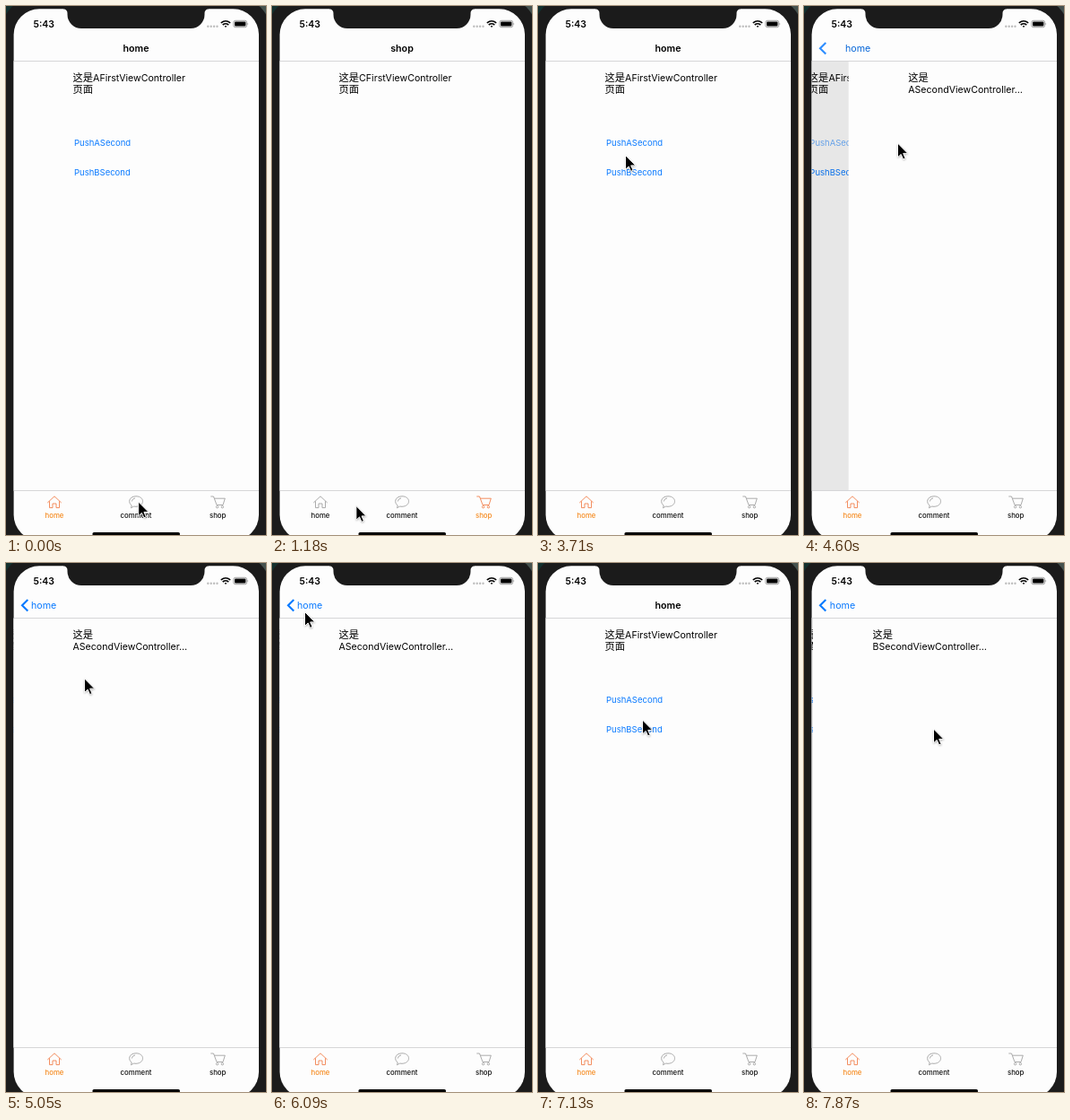
These frames come from a looping animation (290x590 px, 8 s). An HTML page:

```html
<!DOCTYPE html>
<html lang="en">
<head>
<meta charset="utf-8">
<title>Tab and push navigation</title>
<style>
html, body { margin: 0; width: 100%; height: 100%; overflow: hidden; background: linear-gradient(90deg, #12302e, #46534f); }
svg { display: block; width: 290px; height: 590px; }
text { font-family: Inter, "Noto Sans CJK SC", "Noto Sans CJK", sans-serif; }
.label { font-size: 11.3px; }
.latin { font-size: 10.6px; }
.button { font-size: 9.5px; fill: #0a7aff; }
.title, .back { font-size: 10.7px; }
.title, .clock { font-weight: 600; }
.title, .tab text { text-anchor: middle; }
.clock { font-size: 10.5px; }
.tab { color: #a2a2a2; }
.tab path, .tab circle { fill: none; stroke: currentColor; stroke-width: .9; stroke-linejoin: round; }
.tab text { font-size: 7.8px; font-weight: 500; fill: #111; }
.tab.on { color: #f2824e; }
.tab.on text { fill: #f58a1f; }
.rule { fill: #d6d6d8; }
</style>
</head>
<body>
<svg viewBox="0 0 290 590">
  <defs>
    <clipPath id="screen"><rect x="8.6" y="3.3" width="273.4" height="592.7" rx="28.5"/></clipPath>
    <clipPath id="body"><rect x="8" y="62" width="274" height="478"/></clipPath>
    <filter id="soft" x="-50%" y="-50%" width="200%" height="200%"><feGaussianBlur stdDeviation="1"/></filter>
  </defs>

  <rect x="-6" y="-11" width="302" height="640" rx="42" fill="#1b1b1b"/>

  <g clip-path="url(#screen)">
    <rect x="8" y="3" width="274" height="593" fill="#fdfdfd"/>

    <g clip-path="url(#body)">
      <g id="first">
        <rect x="8" y="62" width="274" height="478" fill="#fdfdfd"/>
        <text class="label" x="74.5" y="83.5">这是<tspan class="latin" id="firstName"></tspan></text>
        <text class="label" x="74.5" y="97">页面</text>
        <g id="buttons">
          <text class="button" id="pushA" x="76" y="156">PushASecond</text>
          <text class="button" id="pushB" x="76" y="189">PushBSecond</text>
        </g>
      </g>
      <rect id="dim" x="8" y="62" width="274" height="478"/>
      <g id="second">
        <rect x="8" y="62" width="274" height="478" fill="#fdfdfd"/>
        <text class="label" x="74.5" y="83.5">这是</text>
        <text class="latin" id="secondName" x="74.5" y="97"></text>
      </g>
    </g>

    <rect class="rule" x="8" y="61" width="274" height="1"/>
    <text class="title" id="title" x="145" y="51"></text>
    <g id="back">
      <path id="chevron" d="M24.3 41 18 47.3 24.3 53.6" fill="none" stroke="#0a7aff" stroke-width="2.1"/>
      <text class="back" id="backName" y="51">home</text>
    </g>

    <rect class="rule" x="8" y="540" width="274" height="1"/>
    <g class="tab">
      <path d="M46.3 554 54 546.8 61.7 554M48.5 552.3V559.6H52V555H56V559.6H59.5V552.3"/>
      <text x="54" y="570.5">home</text>
    </g>
    <g class="tab">
      <path d="M140.2 557C136 554.3 136.7 547 145 546.8 155 546.8 155 558 145 558.3L142.5 558.1 139.5 559.8ZM140.3 552.5Q140.7 549.5 144 548.9"/>
      <text x="145" y="570.5">comment</text>
    </g>
    <g class="tab">
      <path d="M228.3 547H231.5L235 556.5H242L244.3 549.2H232.3"/>
      <circle cx="235.6" cy="558.7" r="1.2"/><circle cx="241.4" cy="558.7" r="1.2"/>
      <text x="236.2" y="570.5">shop</text>
    </g>

    <text class="clock" x="30.5" y="24">5:43</text>
    <path d="M225.3 22.7H236" stroke="#bdbdbd" stroke-width="2.4" stroke-linecap="round" stroke-dasharray="0 3.4"/>
    <g fill="none" stroke="#000" stroke-width="1.6">
      <path d="M239.8 18.9Q245 14.6 250.2 18.9M241.7 21Q245 18.4 248.3 21"/>
      <path d="M245 23.9 243.7 22.5Q245 21.6 246.3 22.5Z" fill="#000" stroke="none"/>
    </g>
    <rect x="253.8" y="16.3" width="14.8" height="7.4" rx="2" fill="none" stroke="#777" stroke-width=".7"/>
    <rect x="255" y="17.5" width="12.4" height="5" rx="1"/>
    <path d="M269.5 18.7Q271 20 269.5 21.3Z" fill="#777"/>
    <rect x="96.4" y="587" width="97.6" height="3.6" rx="1.8"/>
  </g>

  <path d="M64 0V3.3A4.5 4.5 0 0 1 68.5 8V9.5A15.5 15.5 0 0 0 84 25H206A15.5 15.5 0 0 0 221.5 9.5V8A4.5 4.5 0 0 1 226 3.3V0Z" fill="#1b1b1b"/>

  <g id="cursor">
    <path d="M0 1V17L4 13.5 6.5 19 9 18 6.5 12.5H12Z" opacity=".35" filter="url(#soft)"/>
    <path d="M0 0V15.8L3.7 12.4 6.1 17.9 8.6 16.8 6.2 11.4H11.3Z" stroke="#fff"/>
  </g>
</svg>

<script>
const LOOP = 8000, STEP = 148.4, WIDTH = 274;
const DECAY = .01875;   // page slide, per ms
const $ = id => document.getElementById(id);
const tabs = [...document.querySelectorAll('.tab')];
const names = ['home', 'comment', 'shop'];

const taps = [
  { at: 0, tab: 0 }, { at: 140, tab: 1 }, { at: 880, tab: 2 }, { at: 2200, tab: 0 }
];
const slides = [
  { at: -LOOP, open: false, page: 'A' }, { at: 4500, open: true, page: 'A' },
  { at: 6440, open: false, page: 'A' }, { at: 7603, open: true, page: 'B' }
];
const [, pushA, pop, pushB] = slides;

// The pointer eases to each place, then rests until the next move.
const home = [147.7, 553];
const moves = [
  { from: 150, to: 590, place: [215, 559] },
  { from: 890, to: 1330, place: [54, 557] },
  { from: 1630, to: 1920, place: [53, 555] },
  { from: 2510, to: 2660, place: [180, 380] },
  { from: 2660, to: 2960, place: [87, 170] },
  { from: 3560, to: 3710, place: [97.5, 166.5] },
  { from: 3710, to: 4160, place: [104.5, 153] },
  { from: 4750, to: 5650, place: [37, 57] },
  { from: 5800, to: 6080, place: [36.5, 54.5] },
  { from: 6690, to: 7120, place: [116.5, 175] },
  { from: 7120, to: 7420, place: [144.5, 185] }
];

const clamp = v => Math.max(0, Math.min(1, v));
const smooth = p => p * p * (3 - 2 * p);
const latest = (list, t) => list.findLast(item => item.at <= t);
const moveTo = (el, x, y = 0) => el.setAttribute('transform', `translate(${x} ${y})`);

function pointer(t) {
  return moves.reduce((pos, { from, to, place }) => {
    const p = smooth(clamp((t - from) / (to - from)));
    return pos.map((v, i) => v + (place[i] - v) * p);
  }, home);
}

function shownPart({ at, open }, t) {
  const rest = Math.exp(-DECAY * (t - at));
  const left = rest < .005 ? 0 : rest;
  return open ? 1 - left : left;
}

// A pressed control dims just before its slide, then recovers.
function press(el, slide, t) {
  const since = t - slide.at + 60;
  el.style.opacity = since < 0 ? 1 : Math.min(1, .3 + since / 570);
}

function draw(time) {
  const t = Math.floor((time + 10) / STEP) * STEP;
  const { tab } = latest(taps, t);
  const slide = latest(slides, t);
  const shown = shownPart(slide, t);
  const x = WIDTH * (1 - shown);

  tabs.forEach((el, i) => el.classList.toggle('on', i === tab));
  $('firstName').textContent = 'ABC'[tab] + 'FirstViewController';
  $('secondName').textContent = slide.page + 'SecondViewController…';
  $('buttons').style.display = tab ? 'none' : '';
  press($('pushA'), pushA, t);
  press($('pushB'), pushB, t);
  press($('back'), pop, t);

  moveTo($('first'), -.3 * WIDTH * shown);
  moveTo($('second'), x);
  $('dim').style.opacity = .1 * shown;

  $('title').textContent = shown ? '' : names[tab];
  $('back').style.display = shown ? '' : 'none';
  $('chevron').style.opacity = shown;
  const name = $('backName');
  name.setAttribute('x', Math.min(130, 28 + .43 * x));
  name.style.fill = `rgb(${10 * shown},${122 * shown},${255 * shown})`;
  name.style.fontWeight = shown < .5 ? 600 : 400;

  moveTo($('cursor'), ...pointer(t));
}

let start;
function tick(now) {
  start ??= now;
  draw((now - start) % LOOP);
  requestAnimationFrame(tick);
}
draw(0);
requestAnimationFrame(tick);
</script>
</body>
</html>
```
